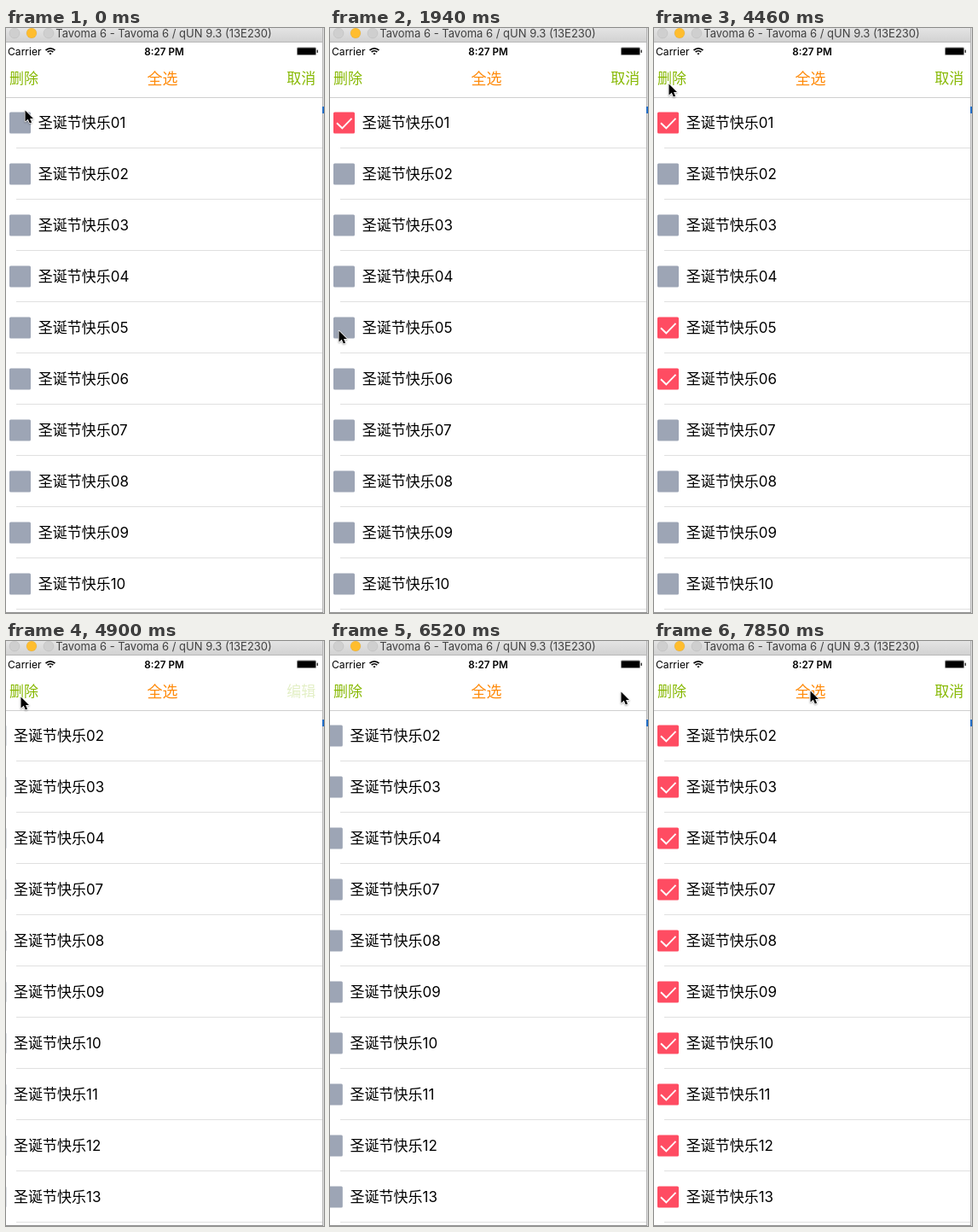
An HTML page with a canvas that plays this animation: 373 px wide and 685 px high, repeating every 8000 ms.

```html
<!DOCTYPE html>
<html lang="zh-CN">
<head>
<meta charset="utf-8">
<title>List editing</title>
<style>
  html, body { margin: 0; width: 100%; height: 100%; overflow: hidden; background: #fff; }
  canvas { display: block; width: 373px; height: 685px; }
</style>
</head>
<body>
<canvas id="stage"></canvas>
<script>
const W = 373, H = 685, LOOP = 8000, TICKS = 54;
const FONT = 'Inter, "Noto Sans CJK SC", "Noto Sans CJK", sans-serif';
const GREEN = '#86b800', ORANGE = '#ff8a0a', GREY = '#9da5b5', PINK = '#ff4c62';
const canvas = document.getElementById('stage');
const ctx = canvas.getContext('2d');
const scale = window.devicePixelRatio || 1;
canvas.width = W * scale;
canvas.height = H * scale;

// The screen refreshes in even ticks; all times below are tick numbers.
const DELETED = 32, REOPENED = 44, ALL_CHECKED = 53;
const checkedAt = { 1: 7, 5: 15, 6: 23 };

// Pointer strokes: each eases out to a stop, bowing sideways on the way.
const HOME = { x: 22, y: 95 };
const STROKES = [
  { from: 0, to: 2, x: 199, y: 87 },
  { from: 2, to: 5, x: 14, y: 113 },
  { from: 8, to: 13, x: 10, y: 353, bowX: 30 },
  { from: 16, to: 19, x: 16, y: 408 },
  { from: 23, to: 30, x: 17, y: 64, bowX: 12 },
  { from: 35, to: 41, x: 341, y: 58, bowY: 11 },
  { from: 45, to: 50, x: 183, y: 57, bowY: 8 }
];

const clamp = v => Math.min(1, Math.max(0, v));
const easeOut = k => 1 - (1 - k) ** 2.25;

function smoothstep(a, b, v) {
  const k = clamp((v - a) / (b - a));
  return k * k * (3 - 2 * k);
}

function pointerAt(tick) {
  let { x, y } = HOME;
  for (const { from, to, x: endX, y: endY, bowX = 0, bowY = 0 } of STROKES) {
    const k = clamp((tick - from) / (to - from));
    const bow = Math.sin(Math.PI * k);
    x += (endX - x) * easeOut(k) + bowX * bow;
    y += (endY - y) * easeOut(k) + bowY * bow;
  }
  return [x, y];
}

function rect(x, y, w, h, color) {
  ctx.fillStyle = color;
  ctx.fillRect(x, y, w, h);
}

function roundRect(x, y, w, h, r, color) {
  ctx.beginPath();
  ctx.roundRect(x, y, w, h, r);
  ctx.fillStyle = color;
  ctx.fill();
}

function text(str, x, y, size, color = '#000', weight = 400, align = 'left') {
  ctx.font = `${weight} ${size}px ${FONT}`;
  ctx.textAlign = align;
  ctx.fillStyle = color;
  ctx.fillText(str, x, y);
}

function polyline(points) {
  ctx.beginPath();
  points.forEach(([x, y]) => ctx.lineTo(x, y));
}

function windowFrame() {
  const bar = ctx.createLinearGradient(0, 0, 0, 16);
  bar.addColorStop(0, '#e4e4e4');
  bar.addColorStop(1, '#d2d2d2');
  rect(0, 0, 371, 16, bar);
  rect(0, 16, 371, 1, '#b8b8b8');
  ['#cfcfcf', '#ffbd2e', '#cfcfcf'].forEach((color, i) => {
    ctx.beginPath();
    ctx.arc(10 + 20 * i, 6, 6, 0, 7);
    ctx.fillStyle = color;
    ctx.fill();
    ctx.lineWidth = 0.5;
    ctx.strokeStyle = 'rgba(0,0,0,.12)';
    ctx.stroke();
  });
  text('Tavoma 6 - Tavoma 6 / qUN 9.3 (13E230)', 185, 11, 13, '#404040', 400, 'center');
  rect(371, 0, 1, H, '#b4b4b4');
  rect(372, 0, 1, H, '#dedede');
  rect(371, 92, 2, 8, '#1f6cc5');
  rect(0, 684, 372, 1, '#909090');
}

function statusBar() {
  text('Carrier', 2, 31.5, 12.1);
  text('8:27 PM', 185.5, 31.5, 11.7, '#000', 600, 'center');
  ctx.strokeStyle = '#000';
  ctx.lineWidth = 1.7;
  for (const r of [1.3, 4.7, 7.7]) {
    ctx.beginPath();
    ctx.arc(52, 31.5, r, -Math.PI * 0.75, -Math.PI * 0.25);
    ctx.stroke();
  }
  roundRect(341, 22.5, 23, 9.5, 1.5, '#8a8a8a');
  roundRect(342, 23.5, 21, 7.5, 0.8, '#000');
  roundRect(364.6, 25.5, 1.3, 3.5, 0.6, '#222');
}

function navBar(tick) {
  text('删除', 4, 65, 17, GREEN);
  text('全选', 183.5, 65.5, 18, ORANGE, 400, 'center');
  const swaps = [DELETED + 0.6, REOPENED];
  const editing = tick < swaps[0] || tick >= swaps[1];
  const distance = Math.min(...swaps.map(swap => Math.abs(tick - swap)));
  ctx.globalAlpha = smoothstep(0, 1.3, distance);
  text(editing ? '取消' : '编辑', 329.3, 65, 17, GREEN);
  ctx.globalAlpha = 1;
  rect(0, 81, 371, 1, '#cfcfcf');
}

function checkbox(x, y, checked) {
  roundRect(x, y - 12.5, 25, 25, 1.5, checked ? PINK : GREY);
  if (!checked) return;
  polyline([[x + 4, y + 0.3], [x + 10.3, y + 6.3], [x + 21.5, y - 5.2]]);
  ctx.strokeStyle = '#fff';
  ctx.lineWidth = 1.9;
  ctx.stroke();
}

function list(tick) {
  const deleted = tick >= DELETED;
  const items = Array.from({ length: 13 }, (_, i) => i + 1)
    .filter(item => !deleted || !checkedAt[item])
    .slice(0, 10);
  const indent = 1 - smoothstep(31.5, 33.5, tick) + smoothstep(43, 44.8, tick);
  items.forEach((item, row) => {
    const y = 111 + row * 60;
    const x = 34 * indent;
    const checked = deleted ? tick >= ALL_CHECKED : tick >= checkedAt[item];
    checkbox(x - 30, y, checked);
    text('圣诞节快乐' + String(item).padStart(2, '0'), x + 3.7, y + 6, 17);
    rect(12, y + 29, 359, 1, '#e0e0e0');
  });
}

function pointer(tick) {
  const [x, y] = pointerAt(tick);
  ctx.save();
  ctx.translate(x + 0.5, y + 1.5);
  ctx.scale(0.86, 0.86);
  polyline([[0, 0], [0, 15], [3.8, 12], [6.2, 17.3], [8.8, 16.2], [6.5, 11], [11, 11]]);
  ctx.closePath();
  ctx.lineJoin = 'round';
  ctx.lineWidth = 1.8;
  ctx.strokeStyle = '#fff';
  ctx.shadowColor = 'rgba(0,0,0,.35)';
  ctx.shadowBlur = 2 * scale;
  ctx.shadowOffsetY = scale;
  ctx.stroke();
  ctx.shadowColor = 'transparent';
  ctx.fillStyle = '#000';
  ctx.fill();
  ctx.restore();
}

function draw(now) {
  const tick = Math.floor((now % LOOP) / LOOP * TICKS + 0.03) % TICKS;
  ctx.setTransform(scale, 0, 0, scale, 0, 0);
  rect(0, 0, W, H, '#fff');
  list(tick);
  navBar(tick);
  statusBar();
  windowFrame();
  pointer(tick);
}

const start = performance.now();
function frame() {
  draw(performance.now() - start);
  requestAnimationFrame(frame);
}
frame();
</script>
</body>
</html>
```
